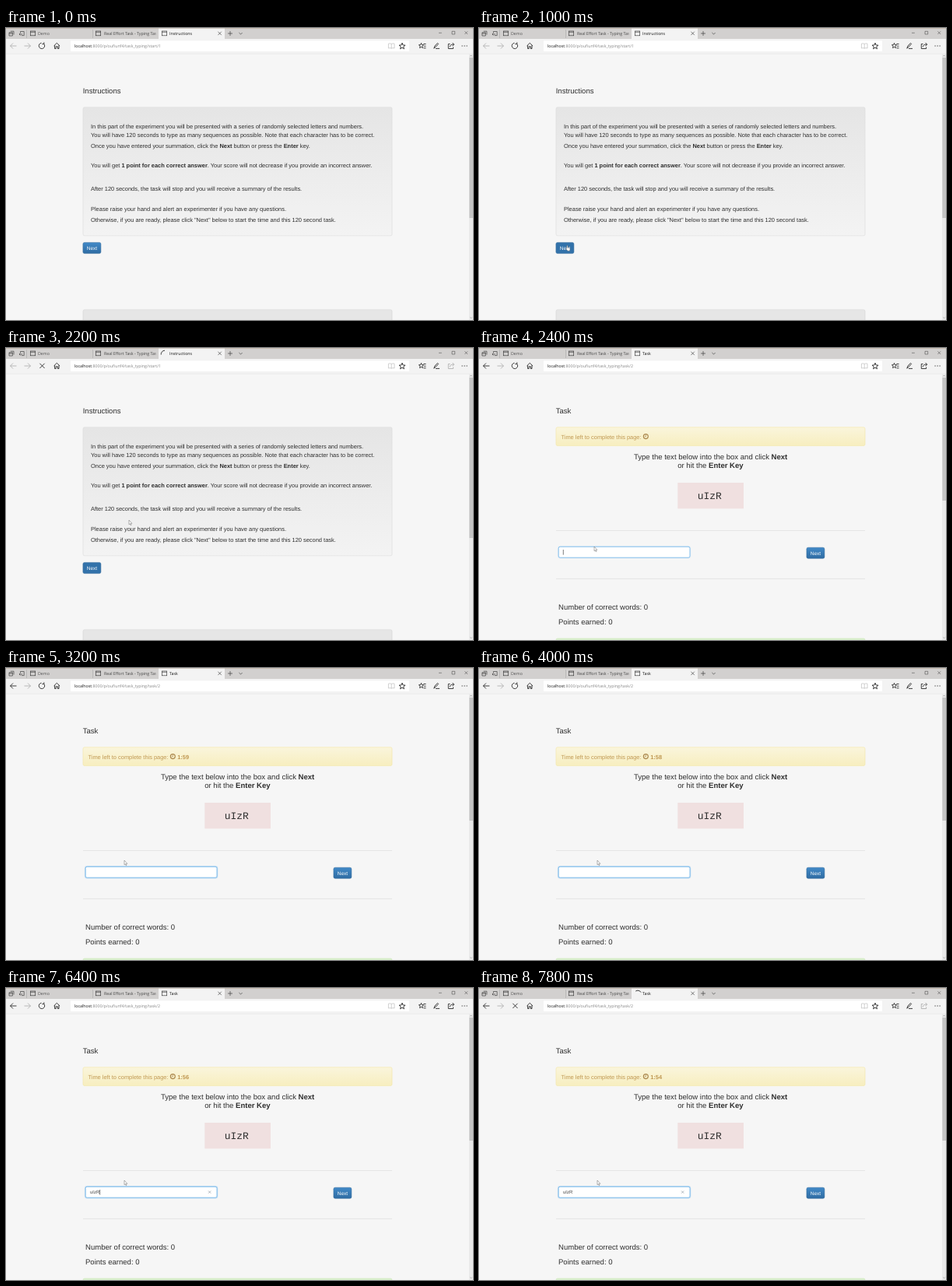
Write an HTML page that moves like this. It is 600 px wide and 375 px high and loops after 8 s.

```html
<!DOCTYPE html>
<html lang="en">
<head>
<meta charset="utf-8">
<title>Typing task</title>
<style>
html, body { margin: 0; height: 100%; overflow: hidden; background: #f6f6f6 }
svg { display: block; width: 100%; height: 100%; font: 7.455px "Liberation Sans", Arial, sans-serif; text-rendering: geometricPrecision; fill: #2e2e2e }
text { white-space: pre }
.b { font-weight: bold }
.big { font-size: 9.55px }
.ui { font: 5.28px "Open Sans", "Noto Sans", sans-serif }
.line { fill: none; stroke: #2a2a2a; stroke-width: .9 }
.thin { stroke-width: .6 }
.dim { stroke: #b0b0b0 }
.btn { font-size: 6.45px; fill: #fff }
.time { fill: #c09853 }
</style>
</head>
<body>
<svg viewBox="0 0 600 375" preserveAspectRatio="none">
<defs>
  <linearGradient id="well" x2="0" y2="1"><stop stop-color="#e5e5e5"/><stop offset="1" stop-color="#f3f3f3"/></linearGradient>
  <linearGradient id="blue" x2="0" y2="1"><stop stop-color="#4189c7"/><stop offset="1" stop-color="#2f6ca3"/></linearGradient>
  <linearGradient id="gold" x2="0" y2="1"><stop stop-color="#faf5dc"/><stop offset="1" stop-color="#f7eebf"/></linearGradient>
  <clipPath id="tabClip"><rect x="126" width="66.5" height="14"/></clipPath>
  <g id="tabIcon" class="line thin"><rect x=".3" y="4" width="6.4" height="5.8"/><path d="M.3 5.3H6.7"/></g>
</defs>

<!-- tab bar -->
<rect width="600" height="14" fill="#d2d0cf"/>
<rect width="600" height=".8" fill="#c4b8aa"/>
<rect x="196" y=".8" width="85" height="13.4" fill="#f3f3f3"/>
<path class="line thin" style="stroke:#aaa" d="M26.5 2V13M111.5 2V13"/>
<g class="line thin">
  <path d="M5.8 4.2H10V8.6M4 5.8H8.4V10H4ZM4 7H8.4"/>
  <path d="M18.5 4.5H23.2V9.6H20M18.5 4.5V6M17 8H21M18.6 6.4L17 8L18.6 9.6"/>
  <path d="M272.4 4.7L276.8 9.1M276.8 4.7L272.4 9.1M285 7H291M288 4V10M299.4 6L301.5 8.1L303.6 6"/>
  <path stroke-width=".45" d="M556 6.3H559.8M573 4.3H576.7V8H573ZM589.4 4.3L593.1 8M593.1 4.3L589.4 8"/>
</g>
<use href="#tabIcon" x="31"/>
<use href="#tabIcon" x="115"/>
<use href="#tabIcon" x="200" id="pageIcon"/>
<path id="spinner" class="line"/>
<g class="ui">
  <text x="41" y="8.8" fill="#555">Demo</text>
  <text x="126" y="8.8" fill="#444" clip-path="url(#tabClip)">Real Effort Task - Typing Task</text>
  <text x="210" y="8.8" fill="#111" id="tabTitle"></text>
</g>

<!-- toolbar -->
<rect y="14" width="600" height="19" fill="#f3f3f3"/>
<rect x="83" y="16.3" width="435" height="13.6" fill="#fff"/>
<path d="M0 33.2H600" stroke="#e2e2e2" stroke-width=".6"/>
<g class="line">
  <path id="back" d="M13.5 23H5.5M9 19.5L5.5 23L9 26.5"/>
  <path class="dim" d="M23.5 23H31.5M28 19.5L31.5 23L28 26.5"/>
  <path id="reload" d="M48.3 20A3.7 3.7 0 1 1 45.5 19.2M48.8 18.4V20.6H46.4"/>
  <path id="stop" d="M43.4 19.8L49.6 26M49.6 19.8L43.4 26"/>
  <path d="M61.5 23L65.3 19.3L69.1 23M62.6 22.2V26.5H64.2V23.8H66.4V26.5H68V22.2"/>
  <path class="thin dim" d="M495.2 20.5V26.2M495.2 20.5C494 19.8 492.5 19.8 491.4 20.2V26C492.5 25.6 494 25.6 495.2 26.2C496.4 25.6 498 25.6 499 26V20.2C498 19.8 496.4 19.8 495.2 20.5"/>
  <path d="M509 19.2L510.1 22L513 22.1L510.7 24L511.5 26.8L509 25.2L506.5 26.8L507.3 24L505 22.1L507.9 22Z"/>
  <path d="M533.5 19.4L534.4 21.6L536.6 21.8L534.9 23.3L535.4 25.6L533.5 24.4L531.6 25.6L532.1 23.3L530.4 21.8L532.6 21.6ZM536.4 20.5H539.5M537 23.2H539.5M536.5 25.8H539.5"/>
  <path d="M549.8 26.2L551 23L554.5 19.3L555.6 20.4L551.8 24.6ZM552 26.4H557"/>
  <path id="share" d="M570.5 20.5H568.3V26.5H574.6V24.4M570.2 24.4C570.4 21.9 572 21.1 575.6 21.1M573.6 19L575.7 21.1L573.6 23.2"/>
</g>
<path d="M585.5 23H586.7M588.5 23H589.7M591.5 23H592.7" stroke="#333" stroke-width="1.1"/>
<text class="ui" x="88" y="25" fill="#111">localhost<tspan id="path" fill="#858585"></tspan></text>

<!-- scrollbar -->
<rect x="595" y="33.5" width="5" height="342" fill="#e9e9e9"/>
<rect x="595.3" y="38" width="4.7" id="thumb" fill="#c4c4c4"/>
<path class="line thin" style="stroke:#777" d="M596.3 36.3L597.5 35.1L598.7 36.3M596.3 371.5L597.5 372.7L598.7 371.5"/>

<text class="big" x="98.7" y="83.5" id="heading"></text>

<g id="intro">
  <rect x="99" y="101.8" width="397" height="165" rx="2" fill="url(#well)" stroke="#dadada" stroke-width=".6"/>
  <rect x="99" y="361.8" width="397" height="60" rx="2" fill="#e6e6e6" stroke="#d6d6d6" stroke-width=".6"/>
  <text x="109" y="128.9">In this part of the experiment you will be presented with a series of randomly selected letters and numbers.</text>
  <text x="109" y="139.5">You will have 120 seconds to type as many sequences as possible. Note that each character has to be correct.</text>
  <text x="109" y="154.4">Once you have entered your summation, click the <tspan class="b">Next</tspan> button or press the <tspan class="b">Enter</tspan> key.</text>
  <text x="109" y="179.4">You will get <tspan class="b">1 point for each correct answer</tspan>. Your score will not decrease if you provide an incorrect answer.</text>
  <text x="109" y="209.4">After 120 seconds, the task will stop and you will receive a summary of the results.</text>
  <text x="109" y="234.5">Please raise your hand and alert an experimenter if you have any questions.</text>
  <text x="109" y="249.4">Otherwise, if you are ready, please click "Next" below to start the time and this 120 second task.</text>
  <rect id="start" x="98.9" y="275.4" width="23" height="14.2" rx="2" stroke="#2f6698" stroke-width=".5"/>
  <text class="btn" x="110.4" y="284.8" text-anchor="middle">Next</text>
</g>

<g id="task">
  <rect x="99" y="101.8" width="397" height="23.8" rx="2" fill="url(#gold)" stroke="#f3e6a6" stroke-width=".6"/>
  <text class="time" x="105.5" y="116.6">Time left to complete this page:</text>
  <g fill="none" stroke="#a9854a"><circle cx="214.3" cy="113.6" r="3" stroke-width="1.1"/><path d="M214.3 111.6V113.8H212.7" stroke-width=".7"/></g>
  <text class="time b" x="220.2" y="116.6" id="clock"></text>
  <g class="big">
    <text x="297.6" y="143.2" text-anchor="middle">Type the text below into the box and click <tspan class="b">Next</tspan></text>
    <text x="297.4" y="153.6" text-anchor="middle">or hit the <tspan class="b">Enter Key</tspan></text>
    <text x="102" y="335.7">Number of correct words: 0</text>
    <text x="102" y="354.6">Points earned: 0</text>
  </g>
  <rect x="255.3" y="173" width="84.7" height="33.3" fill="#f0e0e0"/>
  <text x="280.8" y="193.8" style="font:12.9px 'Liberation Mono',monospace">uIzR</text>
  <path d="M99 234.5H496M99 296.4H496" stroke="#dedede" stroke-width=".7"/>
  <rect id="focus" x="101.8" y="254.8" width="169.6" height="14.8" rx="2.4" fill="none" stroke="#66afe9" stroke-width="1.8"/>
  <rect x="102.2" y="255.2" width="168.8" height="14" rx="2" fill="#fff" stroke="#66afe9" stroke-width=".8"/>
  <text x="108" y="264.2" id="typed" font-size="6" fill="#444"></text>
  <path id="caret" stroke="#222" stroke-width=".6"/>
  <path id="clear" class="line thin" style="stroke:#7d8a96" d="M260 260.5L263.2 263.7M263.2 260.5L260 263.7"/>
  <rect x="420.9" y="256.2" width="23" height="14.1" rx="2" fill="url(#blue)" stroke="#2f6698" stroke-width=".5"/>
  <text class="btn" x="432.4" y="265.6" text-anchor="middle">Next</text>
  <rect x="99" y="373" width="397" height="10" rx="2" fill="#dbf0d0" stroke="#cbe6b8" stroke-width=".6"/>
</g>

<g id="cursor" fill="#fff" stroke="#666" stroke-width=".5">
  <path id="arrow" d="M0 0V5.7L1.3 4.6L2.2 6.6L3 6.2L2.2 4.3H3.9Z"/>
  <path id="hand" d="M.4 .5Q1 -.3 1.5 .5V2.8L4 3.3Q4.6 3.5 4.5 4.3L4 7H1.4L-.8 4.4Q-.6 3.6 .4 4.2Z"/>
</g>
</svg>

<script>
const LOOP = 8000, STEP = 200, PAGE = 2400;
const el = {};
document.querySelectorAll('[id]').forEach(e => el[e.id] = e);
const show = (e, on) => e.setAttribute('visibility', on ? 'inherit' : 'hidden');
const set = (e, attrs) => { for (const k in attrs) e.setAttribute(k, attrs[k]); };

// [time, x, y]
const route = [[200, 27, 0], [800, 108, 279], [1400, 121.5, 279.5], [1600, 121.5, 279.5],
  [2200, 158, 221], [2400, 148, 255], [3000, 152, 247]];
// [time, content of the input]
const keys = [[2300, ''], [4200, 'u'], [4600, 'uI'], [5000, 'uIa'], [5400, 'uI'], [5800, 'uIz'], [6000, 'uIzR']];

function pointAt(t) {
  const i = route.findIndex(p => p[0] > t);
  if (i < 1) return route[i ? route.length - 1 : 0].slice(1);
  const [a, b] = [route[i - 1], route[i]], k = (t - a[0]) / (b[0] - a[0]);
  return [a[1] + (b[1] - a[1]) * k, a[2] + (b[2] - a[2]) * k];
}

function arc(cx, cy, r, from, to) {
  const at = deg => {
    const a = deg * Math.PI / 180;
    return `${cx + r * Math.cos(a)} ${cy + r * Math.sin(a)}`;
  };
  return `M${at(from)}A${r} ${r} 0 0 1 ${at(to)}`;
}

function drawBrowser(t, onTask) {
  const name = onTask ? 'Task' : 'Instructions';
  el.tabTitle.textContent = el.heading.textContent = name;
  el.path.textContent = ':8000/p/oufiunf4/task_typing/' + (onTask ? 'task/2' : 'start/1');
  el.back.style.stroke = onTask ? '#2a2a2a' : '#b0b0b0';
  set(el.thumb, { height: onTask ? 158 : 206 });

  const age = onTask ? t - 6600 : t - 1200, loading = age >= 0;
  for (const id of ['pageIcon', 'reload']) show(el[id], !loading);
  for (const id of ['spinner', 'stop']) show(el[id], loading);
  el.share.style.stroke = loading ? '#b0b0b0' : '#2a2a2a';
  const head = age * .3 - 30, length = 55 - 45 * Math.cos((age - 400) / 220);
  set(el.spinner, { d: arc(204, 8, 4.8, head - length, head) });
}

function drawTask(t) {
  const left = 120 - Math.floor((t - 1950) / 975);
  el.clock.textContent = t > PAGE ? `${Math.floor(left / 60)}:${String(left % 60).padStart(2, '0')}` : '';
  set(el.focus, { opacity: t > PAGE ? .35 : .1 });

  const [since, text] = keys.filter(k => k[0] <= t).pop() || keys[0];
  el.typed.textContent = text;
  show(el.clear, text);
  const x = 108.3 + (text ? el.typed.getComputedTextLength() : 0);
  set(el.caret, { d: `M${x} 259V265.6` });
  show(el.caret, (t - since) % 1060 < 530);
}

function draw(t) {
  const onTask = t >= PAGE;
  show(el.intro, !onTask);
  show(el.task, onTask);
  drawBrowser(t, onTask);
  if (onTask) drawTask(t);
  else for (const id of ['clear', 'caret']) show(el[id], false);
  set(el.start, { fill: t < 800 ? 'url(#blue)' : '#3272aa' });

  const overButton = t >= 800 && t <= 1600;
  set(el.cursor, { transform: `translate(${pointAt(t)})` });
  show(el.arrow, t >= 200 && !overButton);
  show(el.hand, overButton);
}

function tick(now) {
  draw(Math.floor(now % LOOP / STEP) * STEP);
  requestAnimationFrame(tick);
}
draw(0);
requestAnimationFrame(tick);
</script>
</body>
</html>
```
